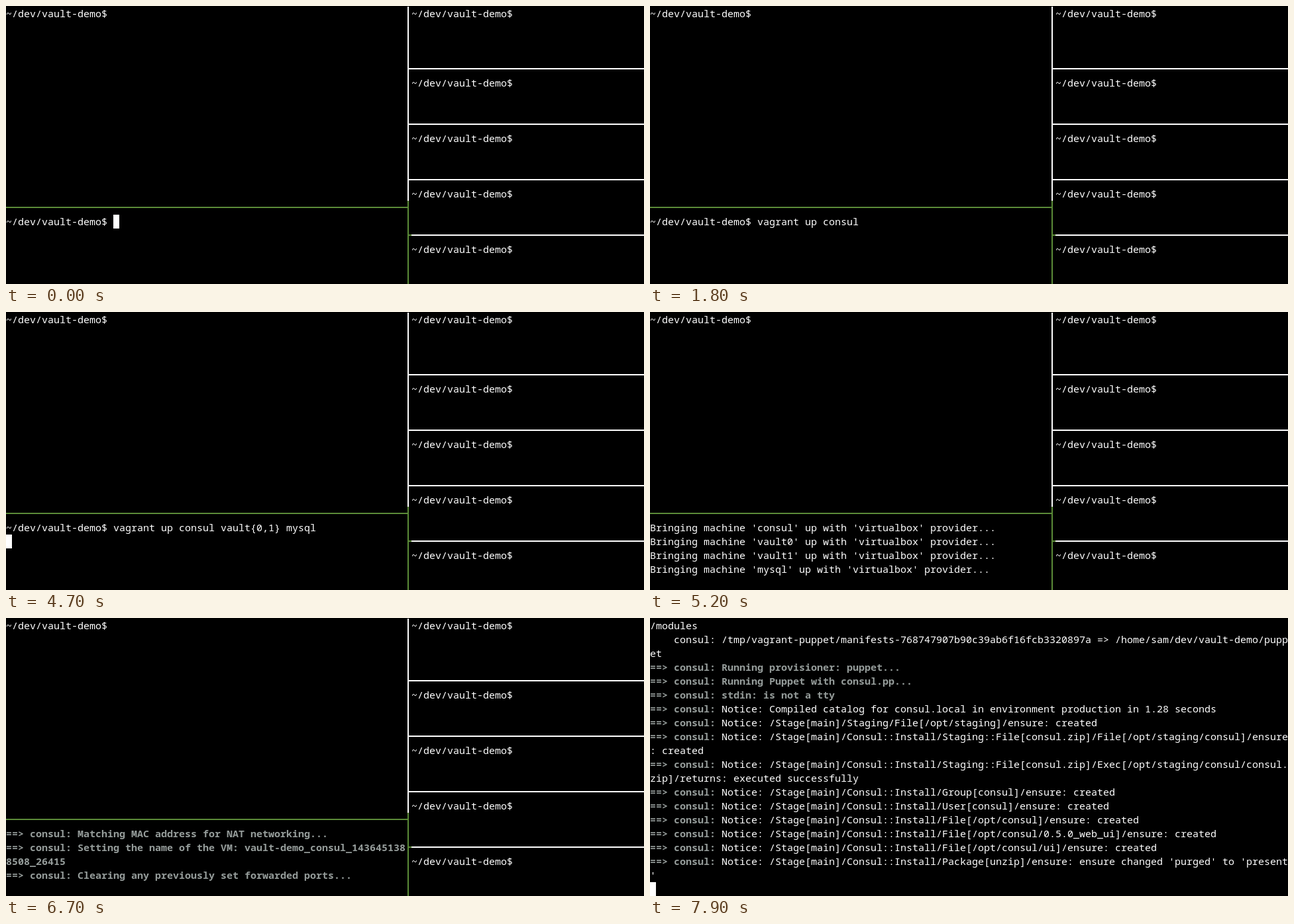
These frames come from a looping animation (963x421 px, 8 s). An HTML page with a canvas:

```html
<!DOCTYPE html>
<html lang="en">
<head>
<meta charset="utf-8">
<title>Terminal session</title>
<style>
html, body { margin: 0; width: 100%; height: 100%; overflow: hidden; background: #000; }
canvas { display: block; }
</style>
</head>
<body>
<canvas id="term" width="963" height="421"></canvas>
<script>
const ctx = document.getElementById('term').getContext('2d');
const W = 963, H = 421, CW = 9, CH = 21, LOOP = 8000;
const WHITE = '#fff', GREY = '#959c9a', GREEN = '#5b8b38';
const FAMILY = '"Noto Sans Mono", "DejaVu Sans Mono", monospace';
const PROMPT = '~/dev/vault-demo$ ';
const SPLIT = 67, PANE_TOP = 15, PANE_ROWS = 5;

// Typed chunks: text, start and end time
const TYPING = [
  ['vagrant up consul', 150, 1150],
  [' vault{0,1}', 2300, 3150],
  [' mysql', 3400, 4000],
];
const ENTER = 4200, OUTPUT = 5100, ZOOM = 7600, BLINK = 600;

const bringing = name => `Bringing machine '${name}' up with 'virtualbox' provider...`;
const step = text => '==> consul: ' + text;
const notice = text => step('Notice: ' + text);
const install = text => notice('/Stage[main]/Consul::Install/' + text);

// Lines printed in the small pane, with their times
const OUTPUT_LOG = [
  ...['consul', 'vault0', 'vault1', 'mysql'].map(name => [OUTPUT, bringing(name)]),
  [5600, step("Importing base box 'trusty64'...")],
  [6300, step('Matching MAC address for NAT networking...')],
  [6500, step('Setting the name of the VM: vault-demo_consul_1436451388508_26415')],
  [6600, step('Clearing any previously set forwarded ports...')],
];

const ZOOM_LOG = [
  '/modules',
  '    consul: /tmp/vagrant-puppet/manifests-768747907b90c39ab6f16fcb3320897a => /home/sam/dev/vault-demo/puppet',
  step('Running provisioner: puppet...'),
  step('Running Puppet with consul.pp...'),
  step('stdin: is not a tty'),
  notice('Compiled catalog for consul.local in environment production in 1.28 seconds'),
  notice('/Stage[main]/Staging/File[/opt/staging]/ensure: created'),
  install('Staging::File[consul.zip]/File[/opt/staging/consul]/ensure: created'),
  install('Staging::File[consul.zip]/Exec[/opt/staging/consul/consul.zip]/returns: executed successfully'),
  install('Group[consul]/ensure: created'),
  install('User[consul]/ensure: created'),
  install('File[/opt/consul]/ensure: created'),
  install('File[/opt/consul/0.5.0_web_ui]/ensure: created'),
  install('File[/opt/consul/ui]/ensure: created'),
  install("Package[unzip]/ensure: ensure changed 'purged' to 'present'"),
];

const rowTop = row => 1 + row * CH;

function rect(x, y, w, h, color) {
  ctx.fillStyle = color;
  ctx.fillRect(x, y, w, h);
}

function boldLength(line) {
  if (!line.startsWith('==>')) return 0;
  return line.includes('Notice:') ? 11 : line.length;
}

// Split a line into rows of styled cells
function wrap(line, cols) {
  const bold = boldLength(line), rows = [];
  for (let i = 0; i < line.length; i += cols) {
    rows.push({ text: line.slice(i, i + cols), bold: bold - i });
  }
  return rows;
}

function drawRow({ text, bold }, col, row) {
  [...text].forEach((ch, i) => {
    const strong = i < bold;
    ctx.font = `${strong ? 'bold ' : ''}15px ${FAMILY}`;
    ctx.fillStyle = strong ? GREY : WHITE;
    ctx.fillText(ch, (col + i) * CW, rowTop(row) + 16);
  });
}

function drawCursor(col, row) {
  rect(col * CW, rowTop(row), CW, CH, WHITE);
}

function drawPanes() {
  const prompt = { text: PROMPT, bold: 0 };
  drawRow(prompt, 0, 0);
  [0, 5, 9, 13, 17].forEach(row => drawRow(prompt, SPLIT + 1, row));
  [4, 8, 12, 16].forEach(row => rect(607, rowTop(row) + 9, W - 607, 2, WHITE));
  rect(606, 1, 2, 294, WHITE);
  rect(606, 295, 2, H - 295, GREEN);
  rect(0, 304, 607, 2, GREEN);
  rect(607, 346, 5, 2, GREEN);
}

function typedAt(t) {
  let text = '', last = 0;
  for (const [chunk, start, end] of TYPING) {
    if (t < start) break;
    const p = Math.min(1, (t - start) / (end - start));
    text += chunk.slice(0, 1 + Math.floor(p * (chunk.length - 1)));
    last = Math.min(t, end);
  }
  return { text, last };
}

function drawShell(t) {
  const { text, last } = typedAt(t);
  const command = PROMPT + text;
  const rows = wrap(command, SPLIT);
  for (const [time, line] of OUTPUT_LOG) {
    if (t >= time) rows.push(...wrap(line, SPLIT));
  }
  // The last row of the pane is kept for the cursor
  rows.slice(1 - PANE_ROWS).forEach((row, i) => drawRow(row, 0, PANE_TOP + i));

  const entered = t >= ENTER;
  const idle = t - (entered ? ENTER : last);
  if (t < OUTPUT && idle % (2 * BLINK) < BLINK) {
    drawCursor(entered ? 0 : command.length, PANE_TOP + (entered ? 1 : 0));
  }
}

function drawZoomed() {
  const rows = ZOOM_LOG.flatMap(line => wrap(line, W / CW));
  rows.forEach((row, i) => drawRow(row, 0, i));
  drawCursor(0, rows.length);
}

function draw(t) {
  rect(0, 0, W, H, '#000');
  if (t >= ZOOM) return drawZoomed();
  drawPanes();
  drawShell(t);
}

const begin = performance.now();
function tick() {
  draw((performance.now() - begin) % LOOP);
  requestAnimationFrame(tick);
}
tick();
</script>
</body>
</html>
```
